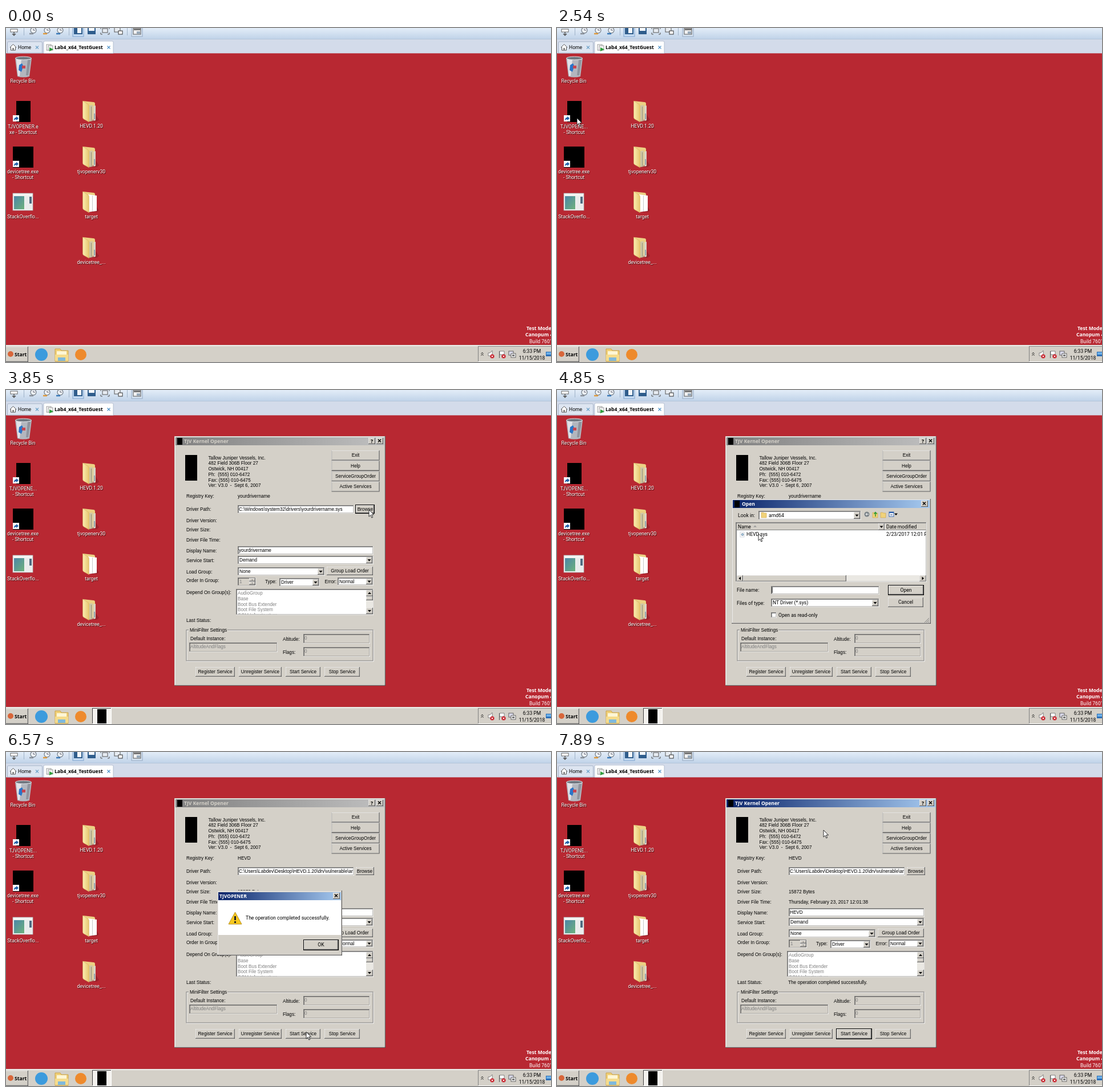
Animation of 955x586 px, one loop 8 s. Source, as an HTML page:

```html
<!DOCTYPE html>
<html lang="en">
<head>
<meta charset="utf-8">
<title>Driver loading demo</title>
<style>
html, body { margin: 0; width: 100%; height: 100%; overflow: hidden; background: #b82832; }
svg { display: block; }
text { font: 8.6px Roboto, sans-serif; white-space: pre; }
.ms { font: 8.2px "Liberation Sans", Arial, sans-serif; }
.b { font: bold 8.6px "Noto Sans", sans-serif; }
</style>
</head>
<body>
<svg id="stage" width="955" height="586" viewBox="0 0 955 586"></svg>
<script>
const FACE = '#d4d0c8', LOOP = 8000;
const EDGE = .8; // width of one bevel line
const raw = String.raw;

// --- drawing helpers: each returns markup ---
const R = (x, y, w, h, f, more = '') => `<rect x="${x}" y="${y}" width="${w}" height="${h}" fill="${f}" ${more}/>`;
const P = (d, f, more = '') => `<path d="${d}" fill="${f}" ${more}/>`;
const L = (d, s, w = 1) => P(d, 'none', `stroke="${s}" stroke-width="${w}"`);
const C = (x, y, r, f, more = '') => `<circle cx="${x}" cy="${y}" r="${r}" fill="${f}" ${more}/>`;
const T = (x, y, s, cls = '', f = '#000', anchor = 'start') =>
  `<text x="${x}" y="${y + 3}" class="${cls}" fill="${f}" text-anchor="${anchor}">${s}</text>`;
const M = (x, y, s, f) => T(x, y, s, 'ms', f);
const G = (id, s) => `<g id="${id}">${s}</g>`;
const clip = (x, y, w, h, s) =>
  `<svg x="${x}" y="${y}" width="${w}" height="${h}" viewBox="${x} ${y} ${w} ${h}" overflow="hidden">${s}</svg>`;

// Two-line bevel: outer light and dark, inner light and dark, then the face.
const bevel = (x, y, w, h, [light, dark, inLight, inDark], f) => {
  const e = EDGE;
  return R(x, y, w, h, dark) + R(x, y, w - e, h - e, light) +
    R(x + e, y + e, w - 2 * e, h - 2 * e, inDark) + R(x + e, y + e, w - 3 * e, h - 3 * e, inLight) +
    R(x + 2 * e, y + 2 * e, w - 4 * e, h - 4 * e, f);
};
const raised = (x, y, w, h) => bevel(x, y, w, h, ['#fff', '#404040', FACE, '#808080'], FACE);
const sunken = (x, y, w, h, f = '#fff') => bevel(x, y, w, h, ['#808080', '#fff', '#404040', FACE], f);
const windowBox = (x, y, w, h) => bevel(x, y, w, h, [FACE, '#404040', '#fff', '#808080'], FACE);
const frame = (x, y, w, h) => R(x - .5, y - .5, w + 1, h + 1, 'none', 'stroke="#000"');
const button = (x, y, w, h, s, cls = 'ms') => raised(x, y, w, h) + T(x + w / 2, y + h / 2 - .3, s, cls, '#000', 'middle');
const tri = (x, y, dx, dy) => P(dy ? `M${x - 3} ${y - 1.5 * dy}h6l-3 ${3.5 * dy}z` : `M${x - 1.5 * dx} ${y - 3}v6l${3.5 * dx} -3z`, '#000');
const arrowBtn = (x, y, w, h, dx, dy) => raised(x, y, w, h) + tri(x + w / 2, y + h / 2, dx, dy);
const combo = (x, y, w, h, s, cls = 'ms') => sunken(x, y, w, h) + T(x + 3, y + h / 2 - .3, s, cls) +
  arrowBtn(x + w - 13, y + 2, 11, h - 4, 0, 1);
const field = (x, y, w, h, s = '') => sunken(x, y, w, h) + clip(x + 2, y, w - 4, h, M(x + 2, y + h / 2 - .3, s));
const closeBtn = (x, y) => raised(x, y, 12, 11) + L(`M${x + 3} ${y + 2.5}l5 5m0 -5l-5 5`, '#000', 1.5);
const titleBar = (x, y, w, fill, s, tx, color = '#fff') => R(x, y, w, 14, fill) + T(tx, y + 6.5, s, 'b', color);
const label = (x, y, s) => T(x + .8, y + .9, s, '', '#300', 'middle') + T(x, y, s, '', '#fff', 'middle');

// --- desktop ---
const defs = `<defs>
<linearGradient id="active"><stop stop-color="#0a246a"/><stop offset="1" stop-color="#a6caf0"/></linearGradient>
<linearGradient id="idle"><stop stop-color="#808080"/><stop offset="1" stop-color="#c0c0c0"/></linearGradient>
<linearGradient id="bar" x2="0" y2="1"><stop stop-color="#e3edf8"/><stop offset="1" stop-color="#bfd2e8"/></linearGradient>
<linearGradient id="leaf"><stop stop-color="#fbedb0"/><stop offset="1" stop-color="#e6c670"/></linearGradient>
<linearGradient id="sea" x2="1" y2="1"><stop stop-color="#4c86a8"/><stop offset="1" stop-color="#6db27c"/></linearGradient>
</defs>`;

function toolbar() {
  const clock = (x, c) => C(x, 4, 5, '#eef2f6', 'stroke="#7c858f" stroke-width="1.3"') +
    L(`M${x} 1v3h3`, '#667') + L(`M${x - 7} 10h7`, c, 2.5);
  const sep = x => R(x, 0, 1, 13, '#9fb2c8');
  return R(0, 0, 955, 20, 'url(#bar)') + R(0, 19, 955, 1, '#b4c5da') + R(0, 20, 955, 24.4, '#d3dbea') +
    R(8, 2, 12, 5, '#fff', 'stroke="#666"') + L('M14 7v5m-3 -2l3 3l3 -3', '#555', 1.5) + sep(31) +
    clock(48, '#8a9099') + clock(72, '#e09a3c') + clock(95, '#3878b8') + sep(110) +
    R(117, -2, 19, 17, '#c5dbf2', 'stroke="#7da2ce"') + R(119, -2, 15, 13, '#2f5d8c') + R(125, 0, 7, 9, '#f4f8fc') +
    R(143, -2, 14, 13, '#2f5d8c') + R(145, -1, 10, 6, '#f4f8fc') +
    R(169, 1, 9, 7, '#e7ecf2', 'stroke="#555"') + L('M166 2v-3m0 9v3h3m9 0h3v-3m0 -6v-3', '#555') +
    R(190, -1, 10, 8, '#e7ecf2', 'stroke="#555"') + R(197, 5, 7, 6, '#fff', 'stroke="#333"') + sep(212) +
    R(220, -2, 19, 17, '#d5e2f0', 'stroke="#93a8c2"') + R(223, 0, 13, 11, '#f2f2f2', 'stroke="#555"') +
    R(224, 1, 12, 3, '#777') + R(229, 6, 6, 4, '#9ab');
}

function tabs() {
  const x = (a, c) => L(`M${a} 31.5l5 5m0 -5l-5 5`, c, 1.1);
  return P('M2.500 44V26q0 -2 2 -2h57q2 0 2 2v18z', '#dde5f1', 'stroke="#a7b4c8"') +
    P('M66 44.400V25q0 -2 2 -2h118q2 0 2 2v19.400z', '#fff', 'stroke="#a7b4c8" stroke-width=".8"') +
    P('M7 34l5.500 -5.500l5.500 5.500h-1.500v5h-8v-5z', '#fff', 'stroke="#555"') + R(11, 35, 3, 4, '#888') +
    T(21, 34, 'Home') + x(52, '#6aa0c8') + x(177.5, '#4a90c8') +
    R(71, 29, 8, 10, '#fff', 'stroke="#999"') + R(74, 31, 8, 8, '#f5f5f5', 'stroke="#999"') +
    P('M76 34l7 3.500l-7 3.500z', '#2e9e3c') + T(85, 34, 'Lab4_x64_TestGuest', 'b');
}

const badge = (x, y) => R(x, y, 11, 11, '#f4f6fa') + P(`M${x + 2} ${y + 9}q0 -5 4 -5v-2l4 3.500l-4 3.500v-2q-2 0 -4 2z`, '#1d5fa8');
const folder = (y, white) => P(`M157 ${y + 24}l6 9l-4 3h-12z`, '#9a222b') +
  P(`M135 ${y}l18 2q3 0 3 3v27l-13 3z`, '#ecd083') +
  (white
    ? P(`M144 ${y + 5}l15 2v27l-15 2z`, '#fff') + L(`M151.500 ${y + 7}v28`, '#c9c9c9')
    : P(`M146 ${y + 8}l6 -1v28l-6 1z`, '#cfc6a6') + P(`M153 ${y + 9}l4 -1v26l-4 1z`, '#d8d4c4') +
      L(`M149.500 ${y + 10}v25`, '#9b9270') + L(`M155 ${y + 22}v10`, '#95a0a8', 2)) +
  P(`M134.500 ${y}l8 5q3 1 3 4v28l-9 -5q-2 -1 -2 -3z`, 'url(#leaf)', 'stroke="#d2ae58" stroke-width=".5"');

function desktop() {
  const bin = P('M16 53h29l-4 32q-11 3 -21 0z', '#b3b6be') +
    P('M18 55h9l-3 29h-3z', '#e2e3e8') + P('M38 56h5l-4 27h-4z', '#8f949e') +
    `<ellipse cx="30.500" cy="53" rx="14" ry="2.800" fill="#6f7780" stroke="#dfe3e7"/>` +
    P('M23 65l5 -3l2 4l3 1l-4 4l-2 6l-5 -3z', '#2b75c8') + R(28, 66, 6, 5, '#c94650');
  const app = R(12, 290, 35, 30, '#f3f4f2', 'stroke="#aeb4b8" stroke-width=".8"') + R(14, 295, 18, 23, 'url(#sea)') +
    R(33, 295, 13, 23, '#e9ecec') + R(41, 296, 4, 12, '#4f6b80');
  return bin + label(29.5, 93, 'Recycle Bin') +
    G('sel', R(1, 128, 58, 61, '#3f6fb5', 'fill-opacity=".55" stroke="#9cc0ea"')) +
    R(18, 128, 25, 37, '#000') + badge(12, 153) +
    G('longName', label(30, 172.5, 'TJVOPENER.e') + label(30, 183, 'xe - Shortcut')) +
    G('shortName', label(30, 172.5, 'TJVOPENE...') + label(30, 183, '- Shortcut')) +
    R(12, 208, 36, 37, '#000') + badge(12, 233) + label(29.5, 252, 'devicetree.exe') + label(29.5, 262, '- Shortcut') +
    app + label(30, 331, 'StackOverflo...') +
    ['HEVD.1.20', 'tjvopenerv30', 'target', 'devicetree_...'].map((s, i) =>
      folder(128 + Math.round(i * 79.6), i === 2) + label(149.5, 172.3 + i * 79.5, s)).join('') +
    T(912, 527, 'Test Mode', 'b', '#fff') + T(910, 538, 'Canopum 4', 'b', '#fff') + T(917, 550, 'Build 7601', '', '#fff');
}

function taskbar() {
  const alert = (x, y) => C(x, y, 3.6, '#c8202a') + L(`M${x - 1.5} ${y - 1.5}l3 3m0 -3l-3 3`, '#fff');
  return R(0, 556, 955, 30, FACE) + R(0, 557, 955, 1, '#fff') + raised(-2, 559, 41, 27) +
    C(8, 572, 5, '#d8663a') + T(15, 572.5, 'Start', 'b') +
    C(62, 573, 11, '#3c9bdd') +
    P('M86 563h9l2 3h12v19H86z', '#f0d077', 'stroke="#c9a24a"') + R(89, 567, 17, 8, '#fdf6d5') +
    P('M86 573h23v11H86z', '#f5dc8c') + P('M91 584v-6h13v6', '#7fb9dc') + C(131, 573, 10, '#ee8a2c') +
    G('task', R(151, 558, 34, 28, '#fff') + R(151, 558, 33, 27, '#404040') + R(152, 559, 32, 26, '#f4f2ee') + R(160, 560, 16, 25, '#000')) +
    R(827, 558, 130, 28, '#fff') + R(827, 558, 130, 27, '#808080') + R(828, 559, 130, 26, FACE) +
    L('M832.500 571.500l2 -2l2 2m-4 3l2 -2l2 2', '#000') +
    P('M845 570h3l4 -4v13l-4 -4h-3z', '#fff', 'stroke="#666" stroke-width=".8"') + alert(852, 576) +
    L('M864.500 567v12', '#555') + P('M865 567h8v6h-8z', '#fff', 'stroke="#666" stroke-width=".8"') + alert(872, 576) +
    R(881, 567, 8, 7, '#dde', 'stroke="#444" stroke-width=".8"') + R(885, 571, 8, 7, '#f4f4f4', 'stroke="#444" stroke-width=".8"') + R(887, 573, 4, 3, '#777') +
    T(921.5, 566.5, '6:33 PM', '', '#000', 'middle') + T(921.5, 578.5, '11/15/2018', '', '#000', 'middle') +
    R(946, 568, 9, 8, '#2c6fb8') + R(947, 569, 8, 4, '#6bb0ea');
}

// --- windows ---
const group = (x, y, w, h) => R(x + .5, y + .5, w, h, 'none', 'stroke="#fff"') + R(x - .5, y - .5, w, h, 'none', 'stroke="#808080"');

function mainWindow() {
  const name = 'TJV Kernel Opener';
  const about = ['Tallow Juniper Vessels, Inc.', '482 Field 306B Floor 27', 'Ostwick, NH 00417',
    'Ph:  (555) 010-6472', 'Fax: (555) 010-6475', 'Ver: V3.0  -  Sept 6, 2007'];
  const rows = [[186, 'Registry Key:'], [209, 'Driver Path:'], [229, 'Driver Version:'], [244.5, 'Driver Size:'],
    [263, 'Driver File Time:'], [281.5, 'Display Name:'], [298.5, 'Service Start:'], [319, 'Load Group:'],
    [334, 'Order In Group:'], [355, 'Depend On Group(s):'], [403.5, 'Last Status:']];
  const groups = ['AudioGroup', 'Base', 'Boot Bus Extender', 'Boot File System', 'COM Infrastructure'];
  const values = (id, key, path, shown) => G(id, M(406, 186, key) + field(406, 202, 204, 15, path) + field(406, 274, 238, 15, shown));
  const dim = (x, y, w, s) => sunken(x, y, w, 17, FACE) + M(x + 2, y + 7, s, '#808080');
  return windowBox(295, 81, 370, 438) +
    G('idleBar', titleBar(297, 83, 366, 'url(#idle)', name, 312, FACE)) +
    G('activeBar', titleBar(297, 83, 366, 'url(#active)', name, 312)) +
    R(300, 84, 9, 12, '#000') + raised(635, 84, 12, 11) + T(641, 90, '?', 'b', '#000', 'middle') + closeBtn(649, 84) +
    R(314, 114, 21, 45, '#000') + about.map((s, i) => M(354.5, 118.7 + i * 9.75, s)).join('') +
    ['Exit', 'Help', 'ServiceGroupOrder', 'Active Services'].map((s, i) => button(570.5, 106 + i * 18.3, 84, 17.5, s)).join('') +
    rows.map(r => M(316, r[0], r[1])).join('') +
    values('blank', 'yourdrivername', raw`C:\Windows\system32\drivers\yourdrivername.sys`, 'yourdrivername') +
    G('filled', values('vals', 'HEVD', raw`C:\Users\Labdev\Desktop\HEVD.1.20\drv\vulnerable\amd64\HEVD.sys`, 'HEVD') +
      M(406, 244.5, '15872 Bytes') + M(406, 263, 'Thursday, February 23, 2017 12:01:38')) +
    raised(613, 202, 32, 14) + G('browseText', T(628.5, 208.7, 'Browse', 'ms', '#000', 'middle')) + G('browseFrame', frame(613, 202, 32, 14)) +
    combo(406, 291, 238, 15, 'Demand') + combo(406, 311, 153, 15, 'None') + button(562, 310, 81, 15, 'Group Load Order') +
    sunken(406, 329, 32, 15, FACE) + M(409, 336, '1', '#808080') + raised(426, 330, 11, 6) + raised(426, 336, 11, 6) +
    P('M430 334l1.500 -2l1.500 2zm0 4h3l-1.500 2z', '#808080') +
    M(454, 335.5, 'Type:') + combo(479, 330, 71, 15, 'Driver') + M(558.5, 335.5, 'Error:') + combo(581, 329, 63, 14, 'Normal') +
    sunken(403, 349, 241, 46) +
    clip(405, 351, 225, 42.5, groups.map((s, i) => M(406, 356.2 + i * 9.7, s, '#808080')).join('')) +
    R(631, 351, 12, 42, '#eae8e3') + arrowBtn(631, 351, 12, 11, 0, -1) + raised(631, 362, 12, 7) + arrowBtn(631, 382, 12, 11, 0, 1) +
    G('status', M(405, 403.5, 'The operation completed successfully.')) +
    group(316.5, 421.5, 327, 54) + R(320, 418, 68, 7, FACE) + M(322, 421.3, 'MiniFilter Settings') +
    M(323, 435.5, 'Default Instance:') + dim(321, 443, 155, 'AltitudeAndFlags') +
    M(485, 436.5, 'Altitude:') + dim(521, 428, 117, '0') + M(485, 460, 'Flags:') + dim(521, 451, 117, '0') +
    button(332, 486, 69, 17, 'Register Service') + button(408, 486, 75, 17, 'Unregister Service') +
    button(490, 486, 61, 17, 'Start Service') + button(558, 486, 62, 17, 'Stop Service') + G('startFrame', frame(490, 486, 61, 17));
}

const miniFolder = (x, y) => P(`M${x} ${y}h4l1 1h4v8h-9z`, '#f0d27a', 'stroke="#c9a040" stroke-width=".6"');

function openDialog() {
  const list = R(315, 234, 332, 12, FACE) + R(315, 245, 332, 1, '#808080') +
    T(317, 239.5, 'Name') + P('M344 240.500l3 -3l3 3z', '#999') + raised(563, 234, 11, 12) + tri(568.5, 240, 0, 1) +
    R(574, 234, 1, 11, '#fff') + T(577, 239.5, 'Date modified') +
    G('pick', R(330, 248, 41, 11, '#0a246a')) +
    R(321, 249, 7, 9, '#fff', 'stroke="#c5cdd6" stroke-width=".8"') + C(325, 253.5, 2, '#a8cbe6', 'stroke="#789" stroke-width=".8"') +
    G('plainName', T(332, 253, 'HEVD.sys')) + G('pickName', T(332, 253, 'HEVD.sys', '', '#fff')) + T(577, 253, '2/23/2017 12:01 PM') +
    R(315, 325, 332, 11, '#eae8e3') + arrowBtn(315, 325, 11, 11, -1, 0) + raised(326, 325, 181, 11) + arrowBtn(635, 325, 12, 11, 1, 0);
  return windowBox(306, 191, 349, 219) + titleBar(308, 193, 345, 'url(#active)', 'Open', 324) + R(311, 194, 9, 12, '#000') + closeBtn(638, 194) +
    T(317, 220, 'Look in:') + combo(353, 212, 180, 16, '') + miniFolder(358, 215) + T(371, 220, 'amd64') +
    C(543, 218, 4.5, '#7d858a') + L('M546 218h-5m2 -2l-2 2l2 2', '#fff') +
    miniFolder(553, 215) + L('M558 222v-7m-2.500 2.500l2.500 -3l2.500 3', '#2d9a35', 1.5) + miniFolder(567, 215) +
    R(582, 214, 8, 8, '#fff', 'stroke="#2d62b0"') + R(582, 214, 8, 2, '#2d62b0') + R(584, 218, 4, 2, '#89b') + tri(594, 218, 0, 1) +
    sunken(313, 232, 335, 105) + clip(314.6, 233.6, 332, 102, list) +
    T(315, 350.5, 'File name:') + sunken(375, 344, 190, 15) + G('caret', R(376.5, 346, 1, 10, '#000')) + G('fileName', T(378, 351, 'HEVD.sys')) +
    T(315, 373.5, 'Files of type:') + combo(375, 366, 190, 15, 'NT Driver (*.sys)', '') +
    sunken(375, 390, 10, 10) + T(388, 395, 'Open as read-only') +
    button(581, 343, 61, 16, 'Open', '') + frame(581, 343, 61, 16) + button(580, 364, 62, 17, 'Cancel', '') +
    L('M644 408l8 -8m-5 8l5 -5m-2 5l2 -2', '#808080');
}

const message = () => windowBox(370, 243, 219, 114) + titleBar(372, 246, 215, 'url(#active)', 'TJVOPENER', 374) + closeBtn(573, 247) +
  R(372, 260, 215, 61, '#fff') + P('M401.500 281l11.500 21h-23z', '#f7c81e', 'stroke="#b89226" stroke-linejoin="round"') +
  R(400, 288, 3, 7, '#222') + R(400, 297, 3, 3, '#222') + T(420, 290.5, 'The operation completed successfully.') +
  button(522, 330, 60, 17, 'OK', '') + frame(522, 330, 60, 17);

const stage = document.getElementById('stage');
stage.innerHTML = defs + R(0, 0, 955, 586, '#b82832') + toolbar() + tabs() + desktop() + taskbar() +
  G('main', mainWindow()) + G('open', openDialog()) + G('msg', message()) +
  G('cursor', P('M0 0v12.200l2.800 -2.700l2 4.600l1.900 -.8l-2 -4.500h3.900z', '#fff', 'stroke="#000" stroke-width=".8"'));

const parts = {};
stage.querySelectorAll('g[id]').forEach(g => parts[g.id] = g);

// Pointer moves: first step, last step, number of steps, destination.
const start = [811, 546];
const moves = [
  [220, 370, 3, 601, 429], [600, 680, 2, 517, 410], [1140, 1220, 2, 515, 410], [1370, 1600, 4, 176, 261],
  [1770, 2060, 5, 35, 158], [2850, 3080, 4, 625, 217], [3230, 3540, 5, 636, 210], [4320, 4550, 4, 382, 262],
  [4700, 4850, 3, 353, 252], [5630, 5790, 3, 464, 462], [6020, 6090, 2, 533, 504], [6260, 6340, 2, 526, 491],
  [6800, 7030, 4, 528, 390], [7180, 7330, 3, 546, 338], [7560, 7890, 5, 467, 137]
];

function pointer(t) {
  let [x, y] = start;
  for (const [a, b, n, tx, ty] of moves) {
    if (t < a) break;
    const step = Math.min(n, Math.floor((t - a + 4) / (b - a) * (n - 1)) + 1);
    const k = t >= b ? 1 : step / n;
    x += (tx - x) * k;
    y += (ty - y) * k;
  }
  return [x, y];
}

function draw(t) {
  const within = (a, b = LOOP) => t >= a && t < b;
  const show = (id, on) => parts[id].setAttribute('visibility', on ? 'inherit' : 'hidden');
  const active = within(2610, 3850) || within(5170, 6490) || within(7480);
  show('sel', within(2310, 2460));
  show('longName', t < 2460);
  show('shortName', t >= 2460);
  show('main', t >= 2610);
  show('task', t >= 2690);
  show('activeBar', active);
  show('idleBar', !active);
  show('blank', t < 5170);
  show('filled', t >= 5170);
  show('browseFrame', within(3540, 6260));
  show('startFrame', active && t >= 6340);
  show('status', t >= 7560);
  show('open', within(3920, 5095));
  show('caret', !within(4320, 4850) && t < 5020);
  show('pick', t >= 5020);
  show('pickName', t >= 5020);
  show('plainName', t < 5020);
  show('fileName', t >= 5020);
  show('msg', within(6570, 7480));
  show('cursor', t >= 220);
  parts.browseText.setAttribute('transform', within(3770, 3920) ? 'translate(.8 .8)' : '');
  parts.cursor.setAttribute('transform', `translate(${pointer(t).map(Math.round)})`);
}

const began = performance.now();
function tick() {
  draw((performance.now() - began) % LOOP);
  requestAnimationFrame(tick);
}
tick();
</script>
</body>
</html>
```
